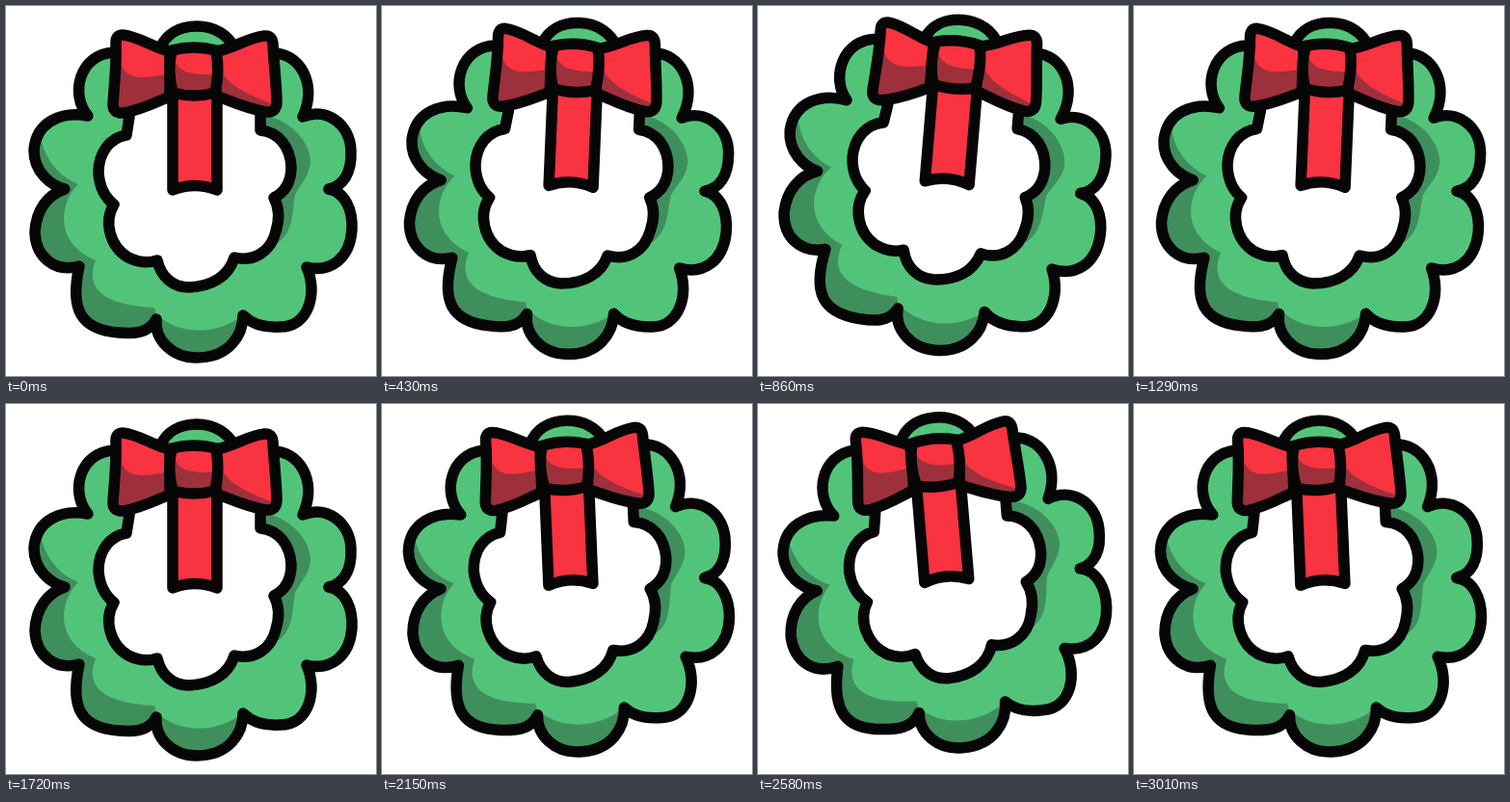
Write an HTML page that moves like this. It is 384x384 px and loops after 3440 ms.

```html
<!DOCTYPE html>
<html lang="en">
<head>
<meta charset="utf-8">
<title>Swinging wreath</title>
<style>
  html, body { margin: 0; width: 100%; height: 100%; overflow: hidden; background: #fff; }
  svg { display: block; width: 100vw; height: 100vh; }
  .line { fill: none; stroke: #060606; stroke-width: 11.5; stroke-linejoin: round; stroke-linecap: round; }
  .green { fill: #52c47a; }
  .shade { fill: #3f8f5d; }
  .red { fill: #f93340; }
  .dark { fill: #9d303b; }
</style>
</head>
<body>
<svg viewBox="0 0 384 384">
  <defs>
    <path id="outer" d="M198 21 C216 21 231 30 237 44 L276 49 C304 48 324 80 308 115
      C332 105 357 122 358 150 C359 173 350 187 335 190
      C352 193 360 212 359 232 C357 262 337 277 312 271
      C324 298 314 333 285 333 C268 334 255 330 246 321
      C246 341 232 365 198 365 C172 365 154 346 156 325
      C148 341 130 340 117 339 C78 336 66 316 76 270
      C51 277 31 261 30 235 C31 212 43 196 61 190
      C46 186 29 172 29 150 C31 120 58 109 85 114
      C66 92 76 50 112 48 L160 44 C166 29 180 21 198 21 Z"/>
    <path id="hole" d="M128 82 L128 115 L125 134 C107 137 96 153 96 173 C97 188 103 199 112 206
      C101 224 108 250 127 261 C137 266 148 267 157 264
      C161 282 174 292 190 292 C213 291 231 281 237 261
      C257 266 275 255 280 234 C284 221 283 208 278 199
      C290 193 296 182 296 167 C295 146 283 131 264 129 L264 82 Z"/>
    <path id="left" d="M170 47 C154 44 137 31 121 30 Q114 30 114 38 C115 62 112 84 111 102 Q111 112 122 111 C140 108 153 101 170 94 Z"/>
    <path id="right" d="M218 47 C237 44 250 33 268 31 Q276 30 277 39 C278 61 281 82 281 101 Q280 111 270 110 C251 107 236 100 218 93 Z"/>
    <path id="knot" d="M172 46 Q195 40 218 46 Q222 68 217 90 Q195 96 173 90 Q167 68 172 46 Z"/>
    <clipPath id="outerClip"><use href="#outer"/></clipPath>
    <clipPath id="leftClip"><use href="#left"/></clipPath>
    <clipPath id="rightClip"><use href="#right"/></clipPath>
    <clipPath id="knotClip"><use href="#knot"/></clipPath>
  </defs>

  <g id="wreath">
    <use href="#outer" class="green"/>
    <g class="shade" clip-path="url(#outerClip)">
      <path d="M20 125 L35 130 C38 154 50 174 75 185 C55 205 50 246 93 264 C84 288 92 310 154 313 L156 320 C180 342 218 342 246 321 L255 380 L20 380 Z"/>
      <path d="M264 113 C294 116 315 140 316 160 C316 176 305 185 300 196 C297 212 299 236 281 246 L260 200 Z"/>
    </g>
    <use href="#hole" fill="#fff"/>
    <use href="#outer" class="line"/>
    <use href="#hole" class="line"/>

    <path id="tail" class="red" d="M173 88 V191 Q196 182 219 191 V88 Z"/>
    <use href="#tail" class="line"/>

    <use href="#left" class="red"/>
    <path class="dark" clip-path="url(#leftClip)" d="M105 30 L117 35 C116 62 122 73 140 74 C152 74 160 72 175 69 V120 H100 Z"/>
    <use href="#left" class="line"/>

    <use href="#right" class="red"/>
    <path class="dark" clip-path="url(#rightClip)" d="M215 60 L222 65 C231 85 257 94 282 104 V120 H215 Z"/>
    <use href="#right" class="line"/>

    <use href="#knot" class="red"/>
    <path class="dark" clip-path="url(#knotClip)" d="M165 50 L175 54 C177 70 196 73 225 70 V100 H165 Z"/>
    <use href="#knot" class="line"/>
  </g>
</svg>
<script>
  const STEP = 430;
  const swing = [0, 1, 2, 1, 0, -1, -2, -1];
  const wreath = document.getElementById("wreath");

  // The wreath tilts in held steps and rises as it leaves the middle.
  function draw(now) {
    const tilt = swing[Math.floor(now / STEP) % swing.length];
    const rise = -3.7 * Math.abs(tilt);
    wreath.setAttribute("transform", `translate(0 ${rise}) rotate(${2.4 * tilt} 195 193)`);
  }

  const start = performance.now();
  function frame() {
    draw(performance.now() - start);
    requestAnimationFrame(frame);
  }
  frame();
</script>
</body>
</html>
```
